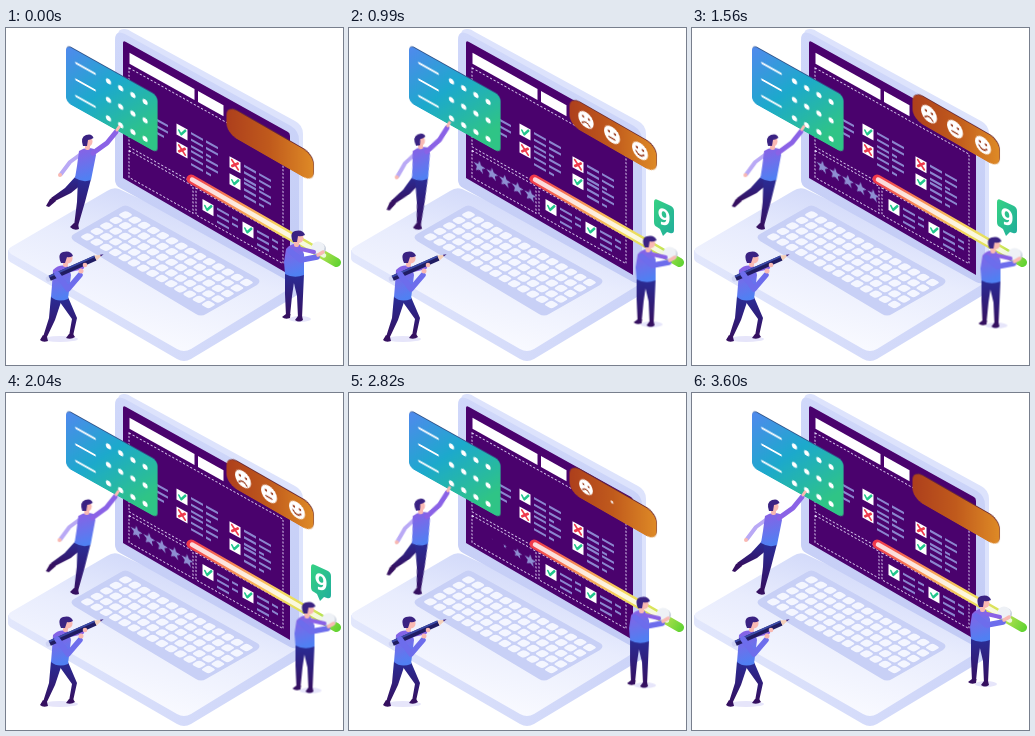
These frames come from a looping animation (337x337 px, 3630 ms). An HTML page:

```html
<!DOCTYPE html>
<html lang="en">
<head>
<meta charset="utf-8">
<title>Online survey</title>
<style>
html, body { margin: 0; width: 100%; height: 100%; overflow: hidden; background: #fff; }
svg { display: block; width: 100vw; height: 100vh; }
.line { fill: none; stroke-linecap: round; stroke-linejoin: round; }
.skin { fill: #f9b9b2; }
.hair { fill: #3a2282; }
.shoe { fill: #351060; }
.dash { fill: none; stroke: #dccff2; stroke-width: 1; stroke-dasharray: 2 1.6; }
.bar { stroke: #8b86cf; stroke-width: 2.3; stroke-dasharray: 12 3; }
.card { animation: rise 1815ms cubic-bezier(.37,0,.63,1) infinite alternate; }
.reach { transform-origin: 70px 200px; animation: lean 907.5ms cubic-bezier(.65,0,.35,1) infinite alternate; }
.slide { animation: slide 3630ms cubic-bezier(.37,0,.63,1) infinite; }
@keyframes rise { to { transform: translateY(-15px); } }
@keyframes lean { to { transform: rotate(-7deg); } }
@keyframes slide {
  0%, 85%, 100% { transform: none; }
  38%, 60% { transform: translate(10.5px, 6.5px); }
}
</style>
</head>
<body>
<svg viewBox="0 0 337 337">
  <defs>
    <linearGradient id="top" x1=".75" y1=".1" x2=".35" y2=".9">
      <stop stop-color="#ced6f9"/><stop offset=".45" stop-color="#e8ecfd"/><stop offset="1" stop-color="#f9faff"/>
    </linearGradient>
    <linearGradient id="side"><stop stop-color="#e2e7fc"/><stop offset="1" stop-color="#cbd3f8"/></linearGradient>
    <linearGradient id="lid" x2="0" y2="1"><stop stop-color="#d0d8fa"/><stop offset="1" stop-color="#c2cbf5"/></linearGradient>
    <linearGradient id="blue" x2="1" y2=".5">
      <stop stop-color="#5288ee"/><stop offset=".5" stop-color="#1ca9cc"/><stop offset="1" stop-color="#2fc486"/>
    </linearGradient>
    <linearGradient id="rust"><stop stop-color="#ad3f1c"/><stop offset=".5" stop-color="#c05a1c"/><stop offset="1" stop-color="#de8a26"/></linearGradient>
    <linearGradient id="range" gradientUnits="userSpaceOnUse" x1="183" y1="150" x2="334" y2="236">
      <stop stop-color="#f0384a"/><stop offset=".3" stop-color="#f78e56"/><stop offset=".6" stop-color="#f7d860"/>
      <stop offset=".83" stop-color="#d3e65a"/><stop offset="1" stop-color="#5fd232"/>
    </linearGradient>
    <linearGradient id="green" x2="1" y2="1"><stop stop-color="#36d283"/><stop offset="1" stop-color="#20ad9c"/></linearGradient>
    <linearGradient id="shirt" x2=".2" y2="1"><stop stop-color="#8d5fe4"/><stop offset="1" stop-color="#5080f2"/></linearGradient>
    <linearGradient id="pants" x2="0" y2="1"><stop stop-color="#2a2d96"/><stop offset="1" stop-color="#351060"/></linearGradient>
  </defs>

  <!-- laptop base -->
  <path fill="url(#side)" d="M2 222 V230 Q2 233 6 235 L171 331 Q178 335 185 331 L293 266 Q297 263 297 259 V248Z"/>
  <path fill="url(#top)" d="M5 219 L101 163 Q107 159 113 161 L294 246 Q299 250 294 254 L185 321 Q178 325 171 321 L5 226 Q0 222 5 219Z"/>
  <path fill="#c8d0f6" d="M115 179 Q119 176 124 179 L251 250 Q256 253 251 257 L200 286 Q195 289 190 286 L68 213 Q63 209 68 206Z"/>
  <g id="keys" transform="matrix(9.3 5.2 -9.5 5.5 119.5 181.5)" fill="#f4f6ff"/>

  <!-- laptop lid -->
  <path fill="#dde3fc" d="M112 7 Q112 0 119 1 Q122 1 126 4 L289 93 Q297 97 297 106 V248 Q296 257 288 253 L112 153Z"/>
  <path fill="url(#lid)" d="M109 12 Q109 1 119 6 L285 98 Q293 103 293 112 V250 Q292 258 284 254 L114 160 Q109 157 109 152Z"/>
  <path fill="#4a026d" d="M117 15 Q117 12 120 14 L282 104 Q284 105 284 108 V247 L117 150Z"/>
  <g id="screen" transform="matrix(1 .56 0 1 117 13)">
    <rect x="6.5" y="8" width="65" height="11" fill="#fff"/>
    <rect x="75" y="8" width="25.500" height="11" fill="#fff"/>
    <rect class="dash" x="6" y="23.500" width="154" height="79"/>
    <rect class="dash" x="6" y="106" width="64" height="27"/>
    <rect class="dash" x="73" y="106" width="87" height="27"/>
  </g>

  <!-- form card -->
  <g id="form" transform="matrix(1 .56 0 1 60 17)">
    <rect x=".5" y="-1" width="91" height="57" rx="5" fill="#31568c"/>
    <rect width="91.500" height="57" rx="5" fill="url(#blue)"/>
  </g>

  <!-- reaching man -->
  <g class="reach">
    <path class="line" stroke="#b9a9f5" stroke-width="4" d="M75 126 L64 134 L55 146"/>
    <circle class="skin" cx="54" cy="147" r="2"/>
    <path fill="url(#pants)" d="M70 148 L81 152 L65 165 L49 173 L45 170 L59 160Z"/>
    <path class="shoe" d="M48 169 L50 173 L43 179 L40 178 L44 171Z"/>
    <path fill="url(#pants)" d="M72 150 L85 151 L79 174 L72 198 H68 L71 174Z"/>
    <path class="shoe" d="M68 195 L72 196 L73 201 Q68 203 64 199Z"/>
    <path fill="url(#shirt)" d="M73 123 Q80 118 88 121 L90 127 L85 152 Q77 155 69 150 L71 138Z"/>
    <path class="line" stroke="#8a62e6" stroke-width="5" d="M87 125 L101 115 L110 104"/>
    <path class="line" stroke="#f9b9b2" stroke-width="3" d="M111 102 L113 99"/>
    <rect class="skin" x="79" y="115" width="5" height="7" rx="2"/>
    <ellipse class="skin" cx="82.500" cy="113.500" rx="4" ry="5"/>
    <path class="hair" d="M77 118 Q74 109 80 107 Q86 105 87.500 110 Q84 112 82 112 L81 118Z"/>
  </g>

  <!-- rating card -->
  <g class="card">
    <g id="rating" transform="matrix(1 .574 0 1 220.500 77)">
      <rect x=".5" y="-1" width="87" height="28" rx="10" fill="#6e2c33"/>
      <rect width="87" height="28" rx="10" fill="url(#rust)"/>
    </g>
  </g>

  <!-- range -->
  <path class="line" stroke="url(#range)" stroke-width="9" d="M185 151 L330.500 234.500"/>
  <path class="line" stroke="#fff" stroke-opacity=".8" stroke-width="4.500" d="M186 151.500 L318 227.500"/>

  <!-- sliding man -->
  <g class="slide">
    <ellipse cx="294" cy="291" rx="11" ry="3" fill="#e6e5fa"/>
    <ellipse cx="313" cy="221" rx="7" ry="6.500" fill="#cbd2dd"/>
    <ellipse cx="312" cy="219.500" rx="6.500" ry="6" fill="#eef1f6"/>
    <path fill="url(#pants)" d="M279 245 L289 248 L286 268 L284 288 H280 L279 266Z"/>
    <path fill="url(#pants)" d="M286 247 L298 246 L297 268 L296 290 H292 L291 268Z"/>
    <path class="shoe" d="M280 286 H284.500 L284 290 Q279 292 276 289Z M292 288 H296 L297 292 Q293 295 289 292Z"/>
    <path fill="url(#shirt)" d="M280 221 Q286 214 294 217 L298 226 V247 Q288 251 279 246 L278 234Z"/>
    <path class="line" stroke="#6d6dec" stroke-width="5.500" d="M284 223 L295 232 L311 229"/>
    <path class="line" stroke="#8a62e6" stroke-width="4" d="M295 221 L308 224"/>
    <path class="line" stroke="#f9b9b2" stroke-width="3.500" d="M312 227 L317 224"/>
    <rect class="skin" x="288" y="211" width="5" height="8" rx="2"/>
    <ellipse class="skin" cx="293" cy="210" rx="4.500" ry="5"/>
    <path class="hair" d="M287 214 Q283 205 289 203 Q297 201 299 207 Q295 209 292 208 L291 214Z"/>
  </g>

  <!-- score bubble -->
  <g transform="translate(314 208)">
    <g id="score">
      <path fill="url(#green)" d="M-9 -34 Q-9 -38 -5 -36 L7 -30.500 Q11 -29 11 -25 V-6 Q11 -2 7 -3 L4 -4 L0 0 L-3 -7 L-6 -9 Q-9 -10 -9 -14Z"/>
      <text transform="matrix(1 .4 0 1 1 -10.500)" text-anchor="middle" font-family="Roboto, sans-serif" font-weight="700" font-size="23" fill="#fff">9</text>
    </g>
  </g>

  <!-- pencil man -->
  <ellipse cx="54" cy="311" rx="18" ry="3" fill="#e6e5fa"/>
  <path fill="url(#pants)" d="M45 268 L56 271 L49 292 L40 311 L37 309 L43 290Z"/>
  <path fill="url(#pants)" d="M51 270 L62 269 L71 290 L67 308 H63 L66 291Z"/>
  <path class="shoe" d="M37 307 L41 309 L42 313 Q37 315 34 312Z M63 306 H67 L69 309 Q65 312 60 310Z"/>
  <path fill="url(#shirt)" d="M47 242 Q54 235 63 239 L65 247 L62 271 Q52 275 45 269 L46 257Z"/>
  <path class="line" stroke="#8a62e6" stroke-width="4.500" d="M63 242 L76 239"/>
  <rect class="skin" x="57" y="231" width="5" height="8" rx="2"/>
  <ellipse class="skin" cx="62" cy="230.500" rx="4.500" ry="5"/>
  <path class="hair" d="M55 235 Q51 226 57 224 Q65 222 67 228 Q63 230 61 229 L59 235Z"/>
  <g transform="translate(41 251.500) rotate(-24)">
    <rect x="-1" y="-2.700" width="6" height="5.400" rx="2" fill="#cfd4f4"/>
    <rect x="3" y="-2.700" width="50" height="5.400" fill="#201c62"/>
    <rect x="3" y="-2.700" width="50" height="1.800" fill="#3c4ba8"/>
    <path fill="#f3cfb8" d="M53 -2.700 L61 0 L53 2.700Z"/>
    <path class="hair" d="M58.500 -1 L62 0 L58.500 1Z"/>
  </g>
  <path class="line" stroke="#6d6dec" stroke-width="5.500" d="M51 246 L62 261 L74 247"/>
  <circle class="skin" cx="75" cy="243" r="2.500"/>
  <circle class="skin" cx="79" cy="237" r="2.300"/>
</svg>
<script>
const LOOP = 3630;
const $ = id => document.getElementById(id);

function add(parent, tag, attrs = {}) {
  const el = document.createElementNS('http://www.w3.org/2000/svg', tag);
  for (const k in attrs) el.setAttribute(k, attrs[k]);
  return parent.appendChild(el);
}

const line = (parent, d, stroke, width) =>
  add(parent, 'path', { class: 'line', d, stroke, 'stroke-width': width });

// Grow from `start`, shrink away from `end`, once per loop.
function pop(el, start, end, span = 400) {
  const at = (ms, s) =>
    ({ offset: ms / LOOP, transform: `scale(${s})`, easing: 'cubic-bezier(.65,0,.35,1)' });
  el.animate(
    [at(0, 0), at(start, 0), at(start + 400, 1), at(end, 1), at(end + span, 0), at(LOOP, 0)],
    { duration: LOOP, iterations: Infinity });
}

function popGroup(parent, x, y, ...times) {
  const g = add(add(parent, 'g', { transform: `translate(${x} ${y})` }), 'g');
  pop(g, ...times);
  return g;
}

for (let row = 0; row < 5; row++)
  for (let col = 0; col < 14; col++)
    add($('keys'), 'rect', { x: col + .1, y: row + .1, width: .82, height: .8, rx: .25 });

const screen = $('screen');

function bars(x, y, widths) {
  widths.forEach((w, i) => add(screen, 'path', { class: 'bar', d: `M${x} ${y + i * 6.5}h${w}` }));
}

function box(x, y, ok) {
  const g = add(screen, 'g', { transform: `translate(${x} ${y})` });
  add(g, 'rect', { x: -5.5, y: -5.5, width: 11, height: 11, fill: '#fff' });
  if (ok) line(g, 'M-3 0L-1 3L3.500 -3.500', '#21c58c', 2);
  else line(g, 'M-3 -3L3 3M3 -3L-3 3', '#ee3a4c', 2.2);
}

bars(33, 60, [13, 13, 8]);
[[59, 58, 1], [59, 76, 0], [112, 61, 0], [112, 78, 1]].forEach(([x, y, ok]) => {
  box(x, y, ok);
  bars(x + 9, y - 4, [30, 30, 20]);
});
[85, 125].forEach(x => {
  box(x, 119, 1);
  bars(x + 9, 115, [21, 21, 12]);
});

const star = Array.from({ length: 10 }, (_, i) => {
  const r = i % 2 ? 2.7 : 6.2, a = (i / 5 - .5) * Math.PI;
  return `${(r * Math.cos(a)).toFixed(2)},${(r * Math.sin(a)).toFixed(2)}`;
}).join(' ');
for (let i = 0; i < 5; i++)
  add(popGroup(screen, 13.5 + 12.7 * i, 118.5, 255 + 75 * i, 2440 + 75 * i),
    'polygon', { points: star, fill: '#8e8fd2' });

const form = $('form');
for (let row = 0; row < 3; row++) {
  line(form, `M10 ${12.5 + 16.5 * row}h19`, '#fff', 1.8);
  for (let col = 0; col < 4; col++)
    add(form, 'circle', { cx: 42.5 + 12.2 * col, cy: 12.5 + 18.5 * row, r: 2.6, fill: '#fff' });
}

// Mouth curve per face, popping from the right.
[[70.5, 'M-4 2Q0 7 4 2'], [42.5, 'M-3 3.500H3'], [16.5, 'M-4 5Q0 0 4 5']].forEach(([x, mouth], i) => {
  const g = popGroup($('rating'), x, 14, 240 + 214 * i, 2330 + 165 * i, 500);
  add(g, 'circle', { r: 8, fill: '#fff' });
  line(g, mouth, '#9a3d20', 1.3);
  for (const cx of [-3, 3]) add(g, 'circle', { cx, cy: -2, r: 1.2, fill: '#9a3d20' });
});

pop($('score'), 296, 2050);
</script>
</body>
</html>
```
